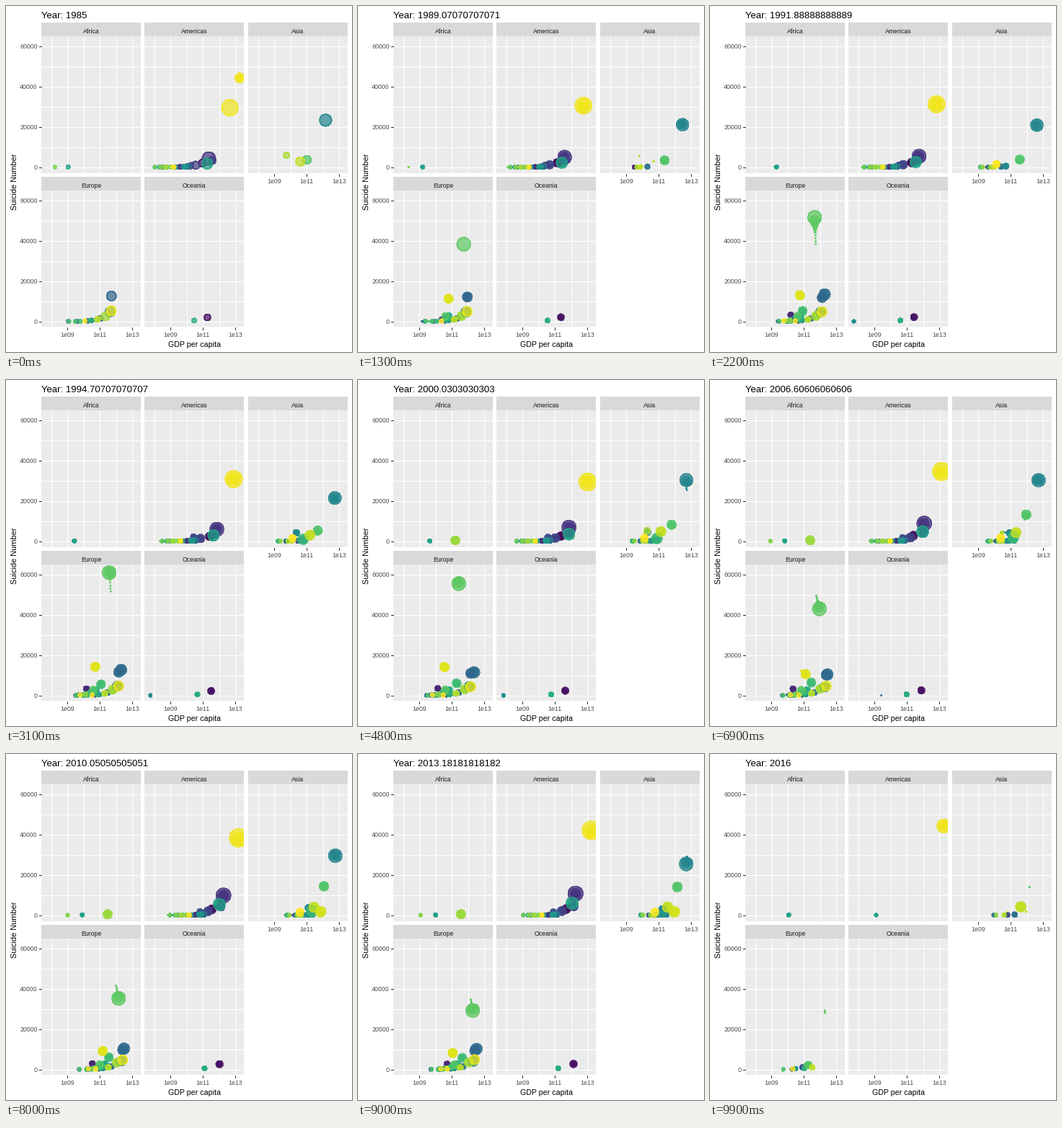
Recreate the animation shown at these times as a matplotlib script. Size 480x480 px, loop 10 s.

```python
import numpy as np
import matplotlib.pyplot as plt
from matplotlib.animation import FuncAnimation
from matplotlib.patches import Rectangle

plt.rcParams["font.family"] = "Liberation Sans"
FRAMES, WAKE = 100, 10
AF, AM, AS, EU, OC = range(5)
PANELS = [("Africa", 49, 23), ("Americas", 192, 23), ("Asia", 336, 23),
          ("Europe", 49, 237), ("Oceania", 192, 237)]
YEARS = 1985 + np.arange(FRAMES) * 31 / 99
viridis = plt.get_cmap("viridis")
rng = np.random.default_rng(7)
tracks = []


def px(panel, gdp):
    return PANELS[panel][1] + 36.5 + (gdp - 9) * 22.5


def py(panel, count):
    return PANELS[panel][2] + 200.5 - count * 56 / 20000


def along(year, keys, first, last):
    return np.interp(year, np.linspace(first, last, len(keys)), keys)


def place(panel, hue, pop, gdp, count, first=1985, last=2015, wraps=False):
    """gdp (log10) and count are keys spread evenly from first to last."""
    end = 2015.7 if wraps else last
    growth = 0 if panel == EU else .01
    people = pop * (1 + growth * (YEARS - 2000))
    tracks.append(dict(
        hue=hue, panel=panel, last=end, wraps=wraps,
        x=px(panel, along(YEARS, gdp, first, last)),
        y=py(panel, along(YEARS, count, first, last)),
        size=2 + 10 * np.sqrt(np.minimum(people / 302, 1)),
        alive=(YEARS >= first - 1e-9) & (YEARS <= end + 1e-9)))


def crowd(panel, n, low, high, curve, wealth, rate, spread=0, stay=3):
    """Small places: people follow from GDP, counts from people."""
    for k, base in enumerate(np.linspace(low, high, n)):
        gdp = base + rng.uniform(-.15, .15)
        pop = 10 ** (gdp - wealth)
        first = 1985 + spread * rng.random()
        last = 2015 if k % stay else 2016
        keys = gdp + along(np.linspace(first, last, 7), curve, 1985, 2015)
        place(panel, rng.integers(101), pop, keys, [rate * pop], first, last)


# Rich European economies rise together
WEST = np.array([-.45, 0, 0, .25, .25])

place(AF, 57, 1.1, [9.03, 9.65, 10.06], [100], last=2016)
place(AF, 81, .08, [8.22, 8.36], [5], last=1987)
place(AF, 81, .08, [8.82, 9.1], [5], 2001.5)
place(AF, 85, 40, [11.1, 11.6], [400], 1996.5)

place(AM, 98, 262, [12.65, 13.01, 13.26], [29446, 31300, 29300, 35200, 44189], wraps=True)
place(AM, 15, 155, [11.35, 11.7, 11.94, 11.76, 12.25, 12.26], [4255, 6800, 11163])
place(AM, 58, 88, [11.25, 11.85, 12.07], [1700, 3450, 6230])
place(AM, 2, 33, [10.95, 11.41, 11.3, 11.77], [1990, 3070])
place(AM, 18, 29, [11.56, 11.87, 12.19], [3260, 4300])
place(AM, 20, 36, [10.54, 11.47], [950, 2100])
place(AM, 19, 14, [10.24, 11.4], [700, 1800])
place(AM, 23, 10.5, [10.34, 10.94], [2200, 1500], 1992)
crowd(AM, 23, 8.6, 10.8, [-.6, -.35, -.15, 0, .1, .35, .45], 9.8, 50, stay=23)

place(AS, 46, 120, [12.15, 12.52, 12.73, 12.69, 12.68, 12.75, 12.64],
      [23257, 20500, 21400, 30250, 30500, 29500, 23000])
place(AS, 73, 45, [11, 11.5, 11.75, 11.8, 12, 12.15],
      [3650, 3200, 6200, 9500, 14500, 13830], last=2014)
place(AS, 87, 15, [9.74, 9.8], [5800, 5500], last=1986.6)
place(AS, 87, 16, [10.14, 10.45], [5600, 4200], 1996, 2006)
place(AS, 91, 54, [10.59, 10.7], [2750], last=1987)
place(AS, 91, 54, [11.2, 11.1, 11.4, 11.61], [2700, 5200, 3800, 4100], 1994, 2016)
place(AS, 68, 65, [10.73, 10.92, 11.35], [750, 2200], 1993, 2011)
place(AS, 100, 22, [10.12, 10.1, 10.8], [1500], 1990, 2014)
place(AS, 47, 15, [10.4, 10.25, 11, 11.27], [4000, 4500, 4000, 2700], 1992)
place(AS, 93, 62, [11.81, 11.97], [1700], 2009, 2014)
crowd(AS, 15, 9.2, 10.9, [-.5, -.3, -.1, 0, .18, .45, .6], 9.9, 45, spread=15)

place(EU, 75, 140, [11.72, 11.6, 11.32, 11.77, 12.1, 12.31],
      [37900, 61400, 57000, 49100, 37200, 27600], 1989, 2014)
place(EU, 33, 55, 12.15 + WEST, [12550, 10900, 9000])
place(EU, 35, 78, [12.25, 12.53], [13900, 11700, 10400, 10100], 1990)
place(EU, 97, 55, 12.14 + WEST, [5200, 4300, 4900])
place(EU, 44, 54, 12.06 + WEST, [4750, 4000])
place(EU, 86, 38, 11.78 + WEST, [2500, 3500])
place(EU, 69, 36, [10.82, 11.24, 11.45, 11.68], [4960, 5900, 6300, 5500], 1990)
place(EU, 95, 45, [10.81, 10.72, 10.5, 11.25, 10.96],
      [10000, 14200, 14000, 9650, 7500], 1987)
place(EU, 74, 21, [10.6, 10.57, 11.27], [2500, 2800, 2200], 1987, 2016)
place(EU, 11, 9.5, [10.2, 10.1, 10.8], [3100, 3500, 2500], 1990)
crowd(EU, 14, 9.4, 11.5, [-.39, -.03, .07, 0, .21, .29, .25], 10.45, 160, stay=4)
crowd(EU, 12, 9.6, 10.7, [.1, .03, .03, 0, .38, .6, .57], 9.6, 190, spread=10)

place(OC, 5, 18, [11.26, 11.62, 12.2], [1950, 2700])
place(OC, 62, 3.7, [10.45, 10.75, 11.25], [400, 530])
place(OC, 48, .08, [7.7, 7.83], [5], 1991, 2001)
place(OC, 31, .8, [9.27, 9.43], [30], 2002, 2004)

tracks.sort(key=lambda t: t["hue"])

fig = plt.figure(figsize=(480 / 72, 480 / 72), dpi=72, facecolor="white")
ax = fig.add_axes([0, 0, 1, 1])
ax.set(xlim=(0, 480), ylim=(480, 0))
ax.axis("off")


def box(x, y, w, h, color):
    return ax.add_patch(Rectangle((x, y), w, h, fc=color, lw=0, zorder=0))


def line(xs, ys, color):
    # Half a pixel off, so that snapping lands on the right pixel
    ax.plot(np.subtract(xs, .5), np.add(ys, .5), color=color, lw=1, zorder=1,
            antialiased=False, solid_capstyle="butt")


def label(x, y, text, size=8.8, color="#4D4D4D", **kw):
    return ax.text(x, y, text, fontsize=size, color=color,
                   **{"ha": "center", "va": "center_baseline", **kw})


clouds = []
for p, (name, x, y) in enumerate(PANELS):
    top, bottom = y + 18.5, y + 209 - (y > 200)
    box(x, y, 138, 18.5, "#D9D9D9")
    label(x + 69, y + 11.5, name, color="#1A1A1A")
    area = box(x, top, 138, bottom - top, "#EBEBEB")
    for g in range(8, 14):
        line([px(p, g)] * 2, [top, bottom], "white")
    for n in range(0, 60001, 10000):
        line([x, x + 138], [py(p, n)] * 2, "white")
    if x == 49:
        for n in range(0, 60001, 20000):
            line([x - 3, x], [py(p, n)] * 2, "#333333")
            label(x - 5.5, py(p, n), str(n), ha="right")
    if p >= AS:
        for g in (9, 11, 13):
            line([px(p, g)] * 2, [bottom, bottom + 3], "#333333")
            label(px(p, g) - .5, bottom + 10.5, f"1e{g:02d}")
    cloud = ax.scatter([], [], lw=1, zorder=3, antialiased=False)
    cloud.set_clip_path(area)
    clouds.append(cloud)

title = label(49, 17, "", 13.2, "black", ha="left", va="baseline")
label(261.5, 473, "GDP per capita", 10.6, "black", va="baseline")
label(12, 244, "Suicide Number", 11, "black", rotation=90, va="center")


def update(i):
    title.set_text(f"Year: {YEARS[i]:.15g}")
    dots = [[] for _ in PANELS]
    for j in range(i - WAKE + 1, i + 1):
        scale = (1 - (i - j) / WAKE) ** 3
        for t in tracks:
            # Places that reach the final year leave no wake behind
            gone = t["last"] == 2015 and YEARS[i] > 2015
            if gone or not t["alive"][j] or (j < 0 and not t["wraps"]):
                continue
            r = max(1.067 * t["size"][j] * scale - .15, .5)
            dots[t["panel"]].append((t["x"][j], t["y"][j], r, t["hue"]))
    for cloud, rows in zip(clouds, dots):
        data = np.array(rows, float).reshape(-1, 4)
        colors = viridis(data[:, 3] / 100)
        colors[:, 3] = .7
        cloud.set_offsets(data[:, :2])
        cloud.set_sizes((2 * data[:, 2]) ** 2)
        cloud.set_facecolors(colors)
        cloud.set_edgecolors(colors)
    return [title, *clouds]


anim = FuncAnimation(fig, update, frames=FRAMES, interval=100, repeat=True,
                     repeat_delay=0, init_func=lambda: update(0))
plt.show()
```
